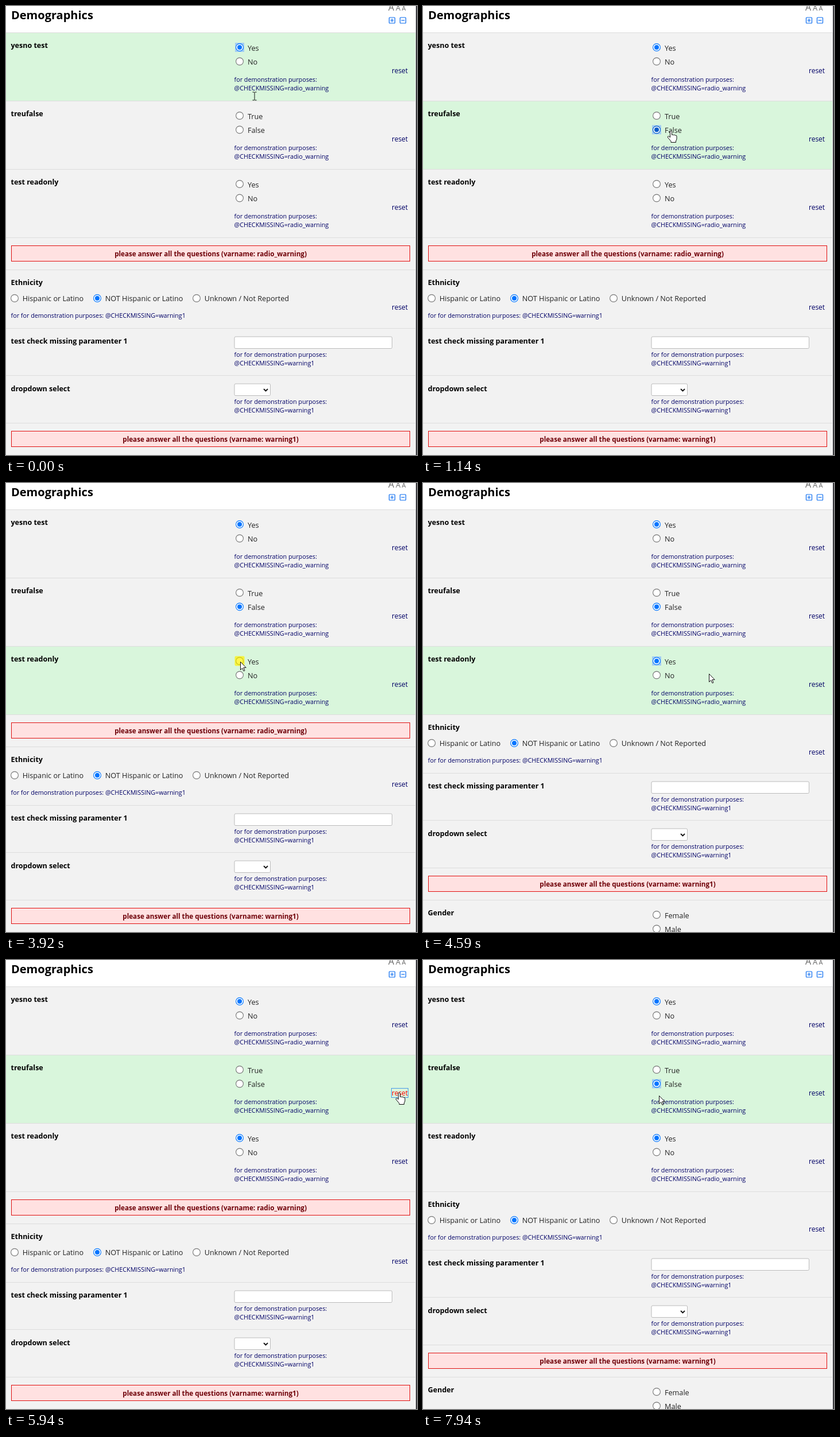
Animation, 716 px wide and 782 px high, one loop 8 s. Source, as an HTML page:

```html
<!DOCTYPE html>
<html lang="en">
<head>
<meta charset="utf-8">
<title>Survey form</title>
<style>
html, body { margin: 0; width: 716px; height: 782px; overflow: hidden; background: #fff; }
svg { display: block; font-family: "Open Sans", sans-serif; }
text { fill: #000; white-space: pre; }
.title { font-size: 20px; font-weight: 700; }
.label { font-size: 12.5px; font-weight: 700; }
.option { font-size: 12.65px; fill: #222; }
.note { font-size: 10.75px; fill: #000066; }
.reset { font-size: 12px; fill: #000066; }
.hot { fill: #f00; }
.warn { font-size: 11.65px; font-weight: 700; fill: #6e0008; text-anchor: middle; }
.size { fill: #666; text-anchor: middle; }
</style>
</head>
<body>
<svg width="716" height="782" viewBox="0 0 716 782"><g id="page"></g><g id="cursor"></g></svg>
<script>
const DURATION = 8000, WARN_HEIGHT = 56;
const page = document.getElementById('page');
const cursor = document.getElementById('cursor');

// Each step changes part of the form; radios are named [row, option].
const steps = [
  [0, { row: 0, picks: [0, -1, -1], focus: [0, 0], hover: null, pressed: null,
        resetHover: false, resetFocus: false, warn: true }],
  [370, { hover: [1, 1] }],
  [1010, { focus: null }],
  [1140, { row: 1, picks: [0, 1, -1], focus: [1, 1] }],
  [1600, { hover: null }],
  [2540, { focus: null }],
  [3850, { hover: [2, 0] }],
  [3920, { row: 2, pressed: [2, 0] }],
  [4060, { picks: [0, 1, 0], pressed: null, focus: [2, 0] }],
  [4120, { warn: false }],
  [4380, { hover: null }],
  [5480, { resetHover: true }],
  [5600, { resetFocus: true }],
  [5800, { row: 1, picks: [0, -1, 0], focus: null }],
  [5940, { warn: true }],
  [6590, { resetHover: false }],
  [7090, { hover: [1, 1] }],
  [7350, { pressed: [1, 1], resetFocus: false }],
  [7480, { picks: [0, 1, 0], pressed: null, focus: [1, 1] }],
  [7610, { warn: false }],
  [7940, { hover: null }]
];

// Pointer keys: time, x, y, shape from that time on.
const moves = [
  [0, 433, 157, 'beam'], [70, 433, 157, 'beam'], [140, 433, 166, 'arrow'], [230, 433, 185, 'hand'],
  [320, 432, 202, 'arrow'], [390, 432, 211, 'hand'], [540, 432, 217, 'hand'],
  [1540, 432, 217, 'hand'], [1610, 431, 240, 'beam'], [1740, 428, 270, 'arrow'],
  [1900, 425, 307, 'arrow'], [2010, 420, 296, 'arrow'], [2535, 420, 296, 'arrow'],
  [2540, 410, 295, 'arrow'], [2740, 410, 295, 'arrow'], [2960, 525, 438, 'arrow'],
  [3250, 525, 438, 'arrow'], [3850, 408, 311, 'arrow'], [4380, 408, 311, 'arrow'],
  [4850, 620, 360, 'arrow'], [5140, 671, 333, 'arrow'], [5200, 671, 333, 'arrow'],
  [5330, 668, 290, 'arrow'], [5480, 680, 236, 'hand'], [5600, 685, 231, 'hand'],
  [6540, 685, 231, 'hand'], [6600, 662, 232, 'arrow'], [7150, 408, 215, 'arrow'],
  [7935, 408, 215, 'arrow'], [7940, 411, 236, 'arrow'], [8000, 411, 236, 'arrow']
];

const outline = d => `<path d="${d}" fill="#fff" stroke="#111" stroke-linejoin="round"/>`;
const shapes = {
  arrow: outline('M.5.5V14.5L3.7 11.4 6 16.5 8 15.6 5.8 10.6H10.2Z'),
  hand: outline('M-1.5 12V1.8a1.5 1.5 0 0 1 3 0V7.5q1.5-1.2 3 .3 1.6-1 3 .5 2.5-.6 2.5 1.7V14q0 2-1.5 4v2.5H0V18.5L-5.5 12q-1-2 1-2.3 1.5 0 3 2.3z'),
  beam: '<path d="M-3.5-7h3M.5-7h3M0-7V7M-3.5 7h3M.5 7h3" fill="none" stroke="#111"/>'
};

const text = (kind, x, y, content) => `<text class="${kind}" x="${x}" y="${y}">${content}</text>`;
const rect = (x, y, w, h, fill, extra = '') =>
  `<rect x="${x}" y="${y}" width="${w}" height="${h}" fill="${fill}" ${extra}/>`;
const line = y => rect(0, y, 713, 1, '#ddd');

function radio(x, y, { checked, hover, focus, pressed } = {}) {
  const color = checked ? (hover ? '#005cc8' : '#0075ff') : (hover ? '#4f4f4f' : '#767676');
  return (focus ? rect(x - 8, y - 8, 16, 16, '#a3cdf2') : '')
    + `<circle cx="${x}" cy="${y}" r="6.4" fill="#fff" stroke="${color}" stroke-width="1.1"/>`
    + (checked ? `<circle cx="${x}" cy="${y}" r="4" fill="${color}"/>` : '')
    + (pressed ? rect(x - 8.5, y - 8.5, 17, 17, '#fff200', 'rx="2" opacity=".7"') : '');
}

const notes = (y, first, second) => text('note', 397.5, y, first) + text('note', 397.5, y + 15, second);

function choiceRow(top, index, label, options, state) {
  const is = (key, option) => state[key] && state[key][0] === index && state[key][1] === option;
  const resetOn = index === 1;
  return rect(0, top, 713, 119, state.row === index ? '#d9f6dc' : '#f2f2f2') + line(top)
    + text('label', 8.5, top + 27, label)
    + options.map((name, i) => radio(407, top + 26 + i * 24.5, {
        checked: state.picks[index] === i, hover: is('hover', i),
        focus: is('focus', i), pressed: is('pressed', i)
      }) + text('option', 421, top + 31.5 + i * 24.5, name)).join('')
    + notes(top + 86, 'for demonstration purposes:', '@CHECKMISSING=radio_warning')
    + text(resetOn && state.resetHover ? 'reset hot' : 'reset', 672, top + 71, 'reset')
    + (resetOn && state.resetFocus
        ? rect(671.5, top + 58.5, 29, 16, 'none', 'stroke="#4a9ae8"') : '');
}

const warning = (top, name) => line(top)
  + rect(9.5, top + 14.5, 694, 27, '#ffe1e1', 'stroke="#e01010"')
  + text('warn', 356.5, top + 33, `please answer all the questions (varname: ${name})`);

const header = () => text('title', 9, 23, 'Demographics')
  + [[671, 16], [683, 13], [693, 11]].map(([x, size]) =>
      `<text class="size" x="${x}" y="8" font-size="${size}">A</text>`).join('')
  + [['M669.5 25h6M672.5 22v6', 667.5], ['M688.5 25h6', 686.5]].map(([d, x]) =>
      rect(x, 20, 10, 10, 'none', 'rx="1" stroke="#0a6cf0" stroke-width="1.2"')
      + `<path d="${d}" stroke="#0a6cf0" stroke-width="1.2"/>`).join('');

function lowerRows(state) {
  const smallNotes = y => notes(y, 'for for demonstration purposes:', '@CHECKMISSING=warning1');
  const field = (y, w) => rect(398, y, w, 20.5, '#fff', 'rx="2" stroke="#bbb"');
  return line(459) + text('label', 8.5, 486, 'Ethnicity')
    + [[15, 'Hispanic or Latino'], [159, 'NOT Hispanic or Latino'], [332, 'Unknown / Not Reported']]
        .map(([x, name], i) => radio(x, 509, { checked: i === 1 })
          + text('option', x + 13.8, 514, name)).join('')
    + text('note', 8.5, 543, 'for for demonstration purposes: @CHECKMISSING=warning1')
    + text('reset', 672, 529, 'reset')
    + line(561) + text('label', 8.5, 588, 'test check missing paramenter 1')
    + field(576, 274.5) + smallNotes(611)
    + line(643) + text('label', 8.5, 671, 'dropdown select')
    + field(658, 62.5) + smallNotes(693)
    + '<path d="M449 667l3.5 3.5 3.5-3.5" fill="none" stroke="#111" stroke-width="1.8"/>'
    + warning(726, 'warning1')
    + choiceRow(782, 3, 'Gender', ['Female', 'Male'], state);
}

const render = state => rect(0, 46, 714, 736, '#f2f2f2') + header()
  + choiceRow(46, 0, 'yesno test', ['Yes', 'No'], state)
  + choiceRow(165, 1, 'treufalse', ['True', 'False'], state)
  + choiceRow(284, 2, 'test readonly', ['Yes', 'No'], state)
  + (state.warn ? warning(403, 'radio_warning') : '')
  + `<g transform="translate(0 ${state.warn ? 0 : -WARN_HEIGHT})">${lowerRows(state)}</g>`
  + rect(714, 0, 2, 782, '#3a3a3e');

let shownStep = -1, shownShape = '';

function draw() {
  const t = performance.now() % DURATION;

  const step = steps.findLastIndex(([at]) => at <= t);
  if (step !== shownStep) {
    shownStep = step;
    page.innerHTML = render(Object.assign({}, ...steps.slice(0, step + 1).map(s => s[1])));
  }

  const i = Math.min(moves.findLastIndex(([at]) => at <= t), moves.length - 2);
  const [t0, x0, y0, shape] = moves[i], [t1, x1, y1] = moves[i + 1];
  const p = (t - t0) / (t1 - t0), eased = p * p * (3 - 2 * p);
  const at = (a, b) => Math.round(a + (b - a) * eased);
  if (shape !== shownShape) cursor.innerHTML = shapes[shownShape = shape];
  cursor.setAttribute('transform', `translate(${at(x0, x1)} ${at(y0, y1)})`);

  requestAnimationFrame(draw);
}
draw();
</script>
</body>
</html>
```
